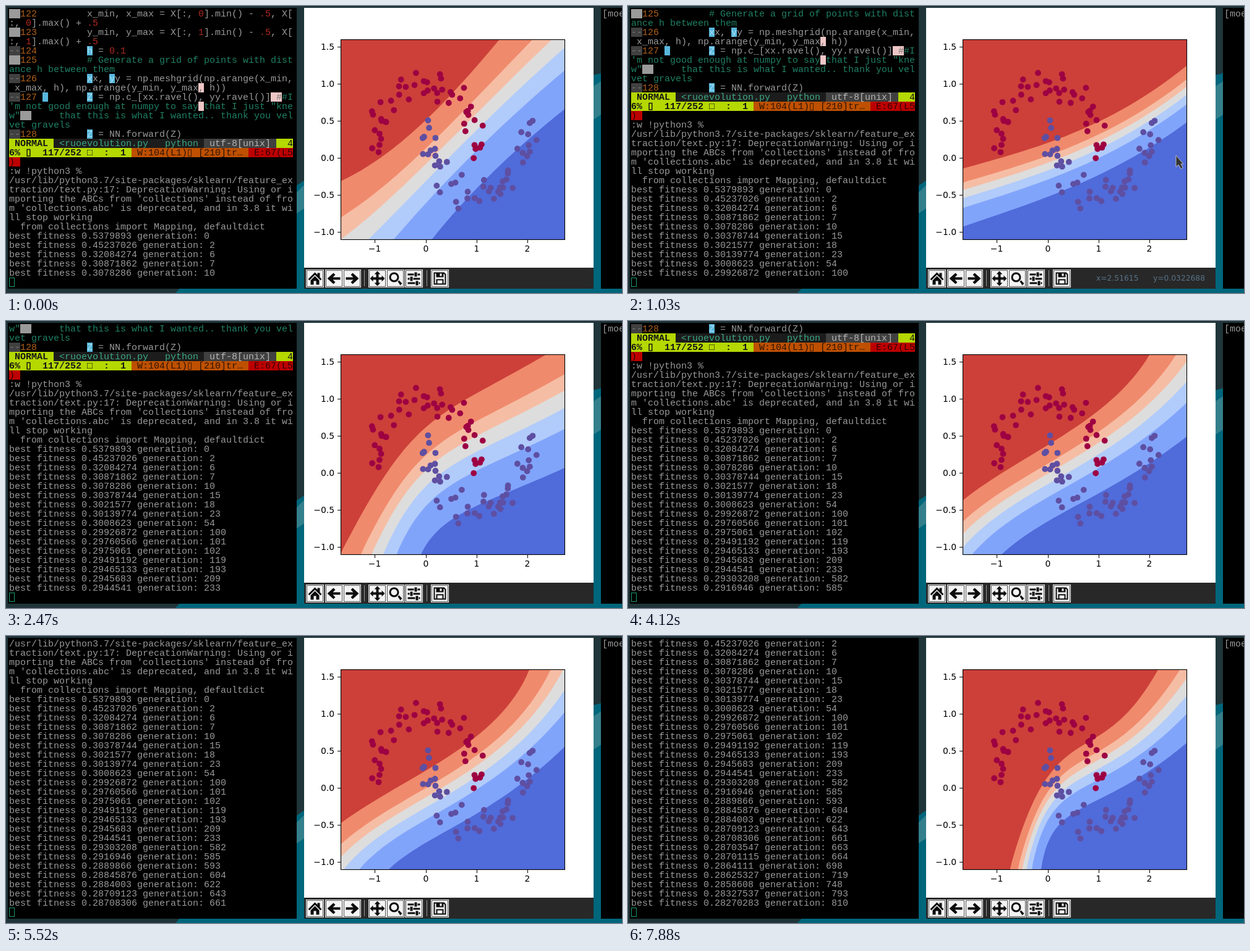
Animation of 996x465 px, one loop 8000 ms. Source, as an HTML page with a canvas:

```html
<!DOCTYPE html>
<html>
<head>
<meta charset="utf-8">
<style>
html, body { margin: 0; width: 100%; height: 100%; overflow: hidden; background: #1f3539; }
canvas { display: block; }
</style>
</head>
<body>
<canvas id="stage" width="996" height="465"></canvas>
<script>
const ctx = document.getElementById('stage').getContext('2d');
const LOOP = 8000, CELL = 9, ROW = 15, ROWS = 29;
const MONO = '15px "Liberation Mono", monospace', SANS = '"DejaVu Sans", sans-serif';
const GREY = '#999', RED = '#b02a22', GREEN = '#1f8064', ORANGE = '#b0601a';
const CYAN = '#58b7dc', PINK = '#efc6c6', LIME = '#b4d800', DARK = '#151515';

// Terminal rows: a text plus spans [column, length, colour, background, bold]
const row = (text, ...spans) => ({ text, spans });
const code = (num, text, marked, ...spans) => row(
  (marked ? '  ' : '--') + num + ' '.repeat(9) + text,
  [0, 2, '#777', marked ? '#9a9a9a' : '#404040'], [2, 3, ORANGE], ...spans);
const comment = text => row(text, [0, text.length, GREEN]);
const red = (col, n = 1) => [col, n, RED];
const cyan = col => [col, 1, '#a9dff2', CYAN];
const pink = (col, n = 1) => [col, n, '#777', PINK];

const lines = [
  code(122, 'x_min, x_max = X[:, 0].min() - .5, X[', true, red(34), red(45, 2)),
  row(':, 0].max() + .5', red(3), red(14, 2)),
  code(123, 'y_min, y_max = X[:, 1].min() - .5, X[', true, red(34), red(45, 2)),
  row(':, 1].max() + .5', red(3), red(14, 2)),
  code(124, 'h = 0.1', false, cyan(14), red(18, 3)),
  code(125, '# Generate a grid of points with dist', true, [14, 37, GREEN]),
  comment('ance h between them'),
  code(126, 'xx, yy = np.meshgrid(np.arange(x_min,', false, cyan(14), cyan(18)),
  row(' x_max, h), np.arange(y_min, y_max, h))', pink(34)),
  code(127, 'Z = np.c_[xx.ravel(), yy.ravel()] ##I', false, cyan(6), cyan(14), pink(47, 2), [49, 2, GREEN]),
  row('\'m not good enough at numpy to say that I just "kne', [0, 51, GREEN], pink(34)),
  row('w"       that this is what I wanted.. thank you vel', [0, 51, GREEN], [2, 2, GREY, '#9a9a9a']),
  comment('vet gravels'),
  code(128, 'Z = NN.forward(Z)', false, cyan(14)),
  row(' NORMAL  <ruoevolution.py   python  utf-8[unix]   4',
    [0, 8, DARK, LIME, true], [8, 27, '#3aa883', '#1c1c1c'], [35, 13, '#b5b5b5', '#404040'], [48, 3, DARK, LIME]),
  row('6% ▯  117/252 □  :  1  W:104(L1)▯ [210]tr…  E:67(L5',
    [0, 22, DARK, LIME, true], [22, 21, '#301400', '#be5000'], [43, 8, '#300', '#bd0000']),
  row(') ', [0, 2, '#300', '#bd0000']),
  row(':w !python3 %'),
  row('/usr/lib/python3.7/site-packages/sklearn/feature_ex'),
  row('traction/text.py:17: DeprecationWarning: Using or i'),
  row("mporting the ABCs from 'collections' instead of fro"),
  row("m 'collections.abc' is deprecated, and in 3.8 it wi"),
  row('ll stop working'),
  row('  from collections import Mapping, defaultdict')
];
const header = lines.length;
const results = `0.5379893 0,0.45237026 2,0.32084274 6,0.30871862 7,0.3078286 10,0.30378744 15,
0.3021577 18,0.30139774 23,0.3008623 54,0.29926872 100,0.29760566 101,0.2975061 102,
0.29491192 119,0.29465133 193,0.2945683 209,0.2944541 233,0.29303208 582,0.2916946 585,
0.2889866 593,0.28845876 604,0.2884003 622,0.28709123 643,0.28708306 661,0.28703547 663,
0.28701115 664,0.2864111 698,0.28625327 719,0.2858608 748,0.28327537 793,0.28270283 810`.split(',');
for (const r of results) {
  const [fit, gen] = r.trim().split(' ');
  lines.push(row(`best fitness ${fit} generation: ${gen}`));
}

// Results arrive in two bursts, each slowing down a little
const printTime = n => n < 16
  ? 110 + 215 * (n - 5) + 1.6 * (n - 5) ** 2
  : 3860 + 222 * (n - 16) + 6.4 * (n - 16) ** 2;
function shownAt(t) {
  let n = 5;
  while (n < results.length && printTime(n) <= t) n++;
  return n;
}

// Decision surface by result count: Bézier curves of its first and last level
const surfaces = [
  [5, 'M500 300 620 262 718 153 830 15', 'M600 520 655 398 785 245 1000 95'],
  [10, 'M500 275 640 235 787 206 940 65', 'M500 372 640 322 787 286 940 160'],
  [16, 'M500 460 670 110 675 180 930 20', 'M650 470 665 290 752 321 980 200'],
  [18, 'M500 330 593 222 800 175 860 20', 'M560 430 650 293 810 305 1020 80'],
  [21, 'M500 320 600 208 798 191 905 20', 'M560 420 655 345 792 300 980 110'],
  [26, 'M520 345 650 262 837 175 780 40', 'M625 420 638 255 810 358 990 60'],
  [30, 'M612 400 690 90 760 250 870 30', 'M664 420 675 220 760 338 990 90']
].map(([count, ...ends]) => ({ count, ends: ends.map(e => e.slice(1).split(' ').map(Number)) }));
const levels = [0, .24, .37, .51, .68, 1];
const bands = ['#f08a6c', '#f6bda5', '#dddddd', '#b1cbfb', '#81a4fb', '#506bda'];

const lerp = (a, b, f) => a + (b - a) * f;
const mix = (a, b, f) => a.map((v, i) => lerp(v, b[i], f));
const ease = f => f * f * (3 - 2 * f);
const plotX = x => 678.594 + x * 82.43;
const plotY = y => 245.872256 - y * 120;

// Two interleaved half circles with seeded noise
let seed = 7;
const random = () => (seed = seed * 16807 % 2147483647) / 2147483647;
const noise = () => (random() + random() + random() - 1.5) * .2;
const moon = place => Array.from({ length: 50 }, (_, i) => {
  const [x, y] = place(Math.PI * i / 49);
  return [plotX(x + noise()), plotY(y + noise())];
});
const redDots = moon(a => [Math.cos(a), Math.sin(a)]);
const blueDots = moon(a => [1 - Math.cos(a), .5 - Math.sin(a)]);

function box(x, y, w, h, fill) {
  ctx.fillStyle = fill;
  ctx.fillRect(x, y, w, h);
}
function shape(fill, d) {
  ctx.fillStyle = fill;
  ctx.fill(new Path2D(d));
}
function cells(text, x, y, color, bold) {
  ctx.font = (bold ? 'bold ' : '') + MONO;
  ctx.fillStyle = color;
  [...text].forEach((c, i) => c !== ' ' && ctx.fillText(c, x + i * CELL, y + 12));
}
function label(text, x, y, align, size, color) {
  ctx.font = `${size}px ${SANS}`;
  ctx.textAlign = align;
  ctx.fillStyle = color;
  ctx.fillText(text, x, y);
  ctx.textAlign = 'left';
}

function desktop() {
  box(0, 0, 996, 465, '#1f3539');
  shape('#00667b', 'M274 465Q380 350 480 284T950 112L996 100V465Z');
  shape('#347f8c', 'M470 302L482 290V328L470 336ZM950 130L962 122V176L950 184Z');
}

function terminals(count) {
  box(3, 3, 467, 455, '#000');
  box(962, 3, 34, 455, '#000');
  cells('[moe', 964, 5, GREY);
  const end = header + count;
  lines.slice(end - ROWS, end).forEach(({ text, spans }, r) => {
    const y = 5 + r * ROW, plain = [...text];
    for (const [col, n] of spans) plain.fill(' ', col, col + n);
    cells(plain.join(''), 5, y, GREY);
    for (const [col, n, fg, bg = '#000', bold] of spans) {
      const x = 5 + col * CELL;
      box(x, y, n * CELL, ROW, bg);
      cells([...text].slice(col, col + n).join(''), x, y, fg, bold);
    }
  });
  ctx.strokeStyle = '#199a70';
  ctx.lineWidth = 1;
  ctx.strokeRect(5.5, 440.5, 8, 14);
}

function surfaceFor(count) {
  const i = Math.max(1, surfaces.findIndex(s => s.count >= count));
  const a = surfaces[i - 1], b = surfaces[i], f = (count - a.count) / (b.count - a.count);
  return a.ends.map((end, k) => mix(end, b.ends[k], f));
}

// Fill everything on the lower right side of a curve
function fillBeyond([x, y, ...curve], color) {
  ctx.beginPath();
  ctx.moveTo(x, y);
  ctx.bezierCurveTo(...curve);
  ctx.lineTo(1100, curve[5]);
  ctx.lineTo(1100, 600);
  ctx.lineTo(x, 600);
  ctx.fillStyle = color;
  ctx.fill();
}

function dots(list, color) {
  ctx.fillStyle = color;
  for (const [x, y] of list) {
    ctx.beginPath();
    ctx.arc(x, y, 4.9, 0, 7);
    ctx.fill();
  }
}

function plot(count) {
  box(482, 3, 468, 421, '#fff');
  ctx.save();
  ctx.beginPath();
  ctx.rect(541, 54, 362, 324);
  ctx.clip();
  box(541, 54, 362, 324, '#cc4039');
  const [first, last] = surfaceFor(count);
  levels.forEach((level, k) => fillBeyond(mix(first, last, level), bands[k]));
  dots(redDots, '#9e0142');
  dots(blueDots, '#5e4fa2');
  ctx.restore();
  ctx.strokeStyle = '#000';
  ctx.lineWidth = 1.1;
  ctx.strokeRect(541.5, 54.5, 362, 324);
  const minus = s => s.replace('-', '−');
  for (let v = -1; v <= 1.5; v += .5) {
    const y = Math.round(plotY(v));
    box(536, y, 5, 1, '#000');
    label(minus(v.toFixed(1)), 531, y + 5, 'right', 13.9, '#000');
  }
  for (let v = -1; v < 3; v++) {
    const x = Math.round(plotX(v));
    box(x, 379, 1, 5, '#000');
    label(minus(String(v)), x, 398, 'center', 13.9, '#000');
  }
}

const arrow = 'M-11 0L-1 -9L2 -6L-2 -2H10V2H-2L2 6L-1 9Z';
const slider = (y, x) =>
  `M-10 ${y - 1}H${x}V${y + 2}H-10ZM${x + 1} ${y - 3}h4v7h-4ZM${x + 6} ${y - 1}H10V${y + 2}H${x + 6}Z`;
const icons = [
  [499, 'M-11 1L0 -10L4 -6V-9H8V-2L11 1L9 3L0 -6L-9 3ZM-7 3L0 -4L7 3V10H2V4H-2V10H-7Z'],
  [530, arrow],
  [559, arrow, -1],
  [600, 'M0 -12L5 -7H2V-2H7V-5L12 0L7 5V2H2V7H5L0 12L-5 7H-2V2H-7V5L-12 0L-7 -5V-2H-2V-7H-5Z'],
  [629, 'M-10 -2A8 8 0 1 1 6 -2A8 8 0 1 1 -10 -2ZM-7 -2A5 5 0 1 0 3 -2A5 5 0 1 0 -7 -2ZM4 5L6 3L11 8L8 11Z'],
  [659, slider(-7, 0) + slider(0, -7) + slider(7, 2)],
  [701, 'M-10 -10H7L10 -7V10H-10ZM-8 -8V8H-6V1H6V8H8V-6L6 -8V-2H-6V-8ZM0 -8V-4H3V-8ZM-4 3V8H4V3Z']
].map(([x, d, flip = 1]) => ({ x, flip, path: new Path2D(d) }));

function toolbar() {
  box(482, 424, 468, 34, '#282828');
  for (const { x, flip, path } of icons) {
    box(x - 14, 427, 29, 29, '#f4f4f4');
    ctx.strokeStyle = '#555';
    ctx.lineWidth = 1;
    ctx.strokeRect(x - 12.5, 428.5, 26, 26);
    ctx.save();
    ctx.translate(x + .5, 441.5);
    ctx.scale(flip, 1);
    ctx.fillStyle = '#0c0c0c';
    ctx.fill(path, 'evenodd');
    ctx.restore();
  }
  box(579, 428, 1, 26, '#999');
  box(680, 428, 1, 26, '#999');
}

const pointerShape = new Path2D('M0 0V19L4 15L8 22L11 20L8 14H12Z');
const rest = [886, 242];

// The pointer glides in, rests over the chart and leaves to the right
function pointer(t) {
  if (t < 110 || t > 1500) return;
  const [x, y] = t < 1080
    ? mix([640, 330], rest, ease(Math.min(1, (t - 110) / 890)))
    : mix(rest, [992, 455], ease((t - 1080) / 420));
  if (x < 903 && y < 378) {
    const data = v => Number(v.toPrecision(6));
    label(`x=${data((x - plotX(0)) / 82.43)}      y=${data((plotY(0) - y) / 120)}`,
      933, 445, 'right', 12.3, '#587286');
  }
  ctx.save();
  ctx.translate(x, y);
  ctx.fillStyle = '#333';
  ctx.strokeStyle = '#bbb';
  ctx.lineWidth = 1;
  ctx.fill(pointerShape);
  ctx.stroke(pointerShape);
  ctx.restore();
}

const start = performance.now();
function draw() {
  const t = (performance.now() - start) % LOOP;
  desktop();
  terminals(shownAt(t));
  plot(shownAt(t - 25)); // the chart follows its printed line
  toolbar();
  pointer(t);
  requestAnimationFrame(draw);
}
draw();
</script>
</body>
</html>
```
